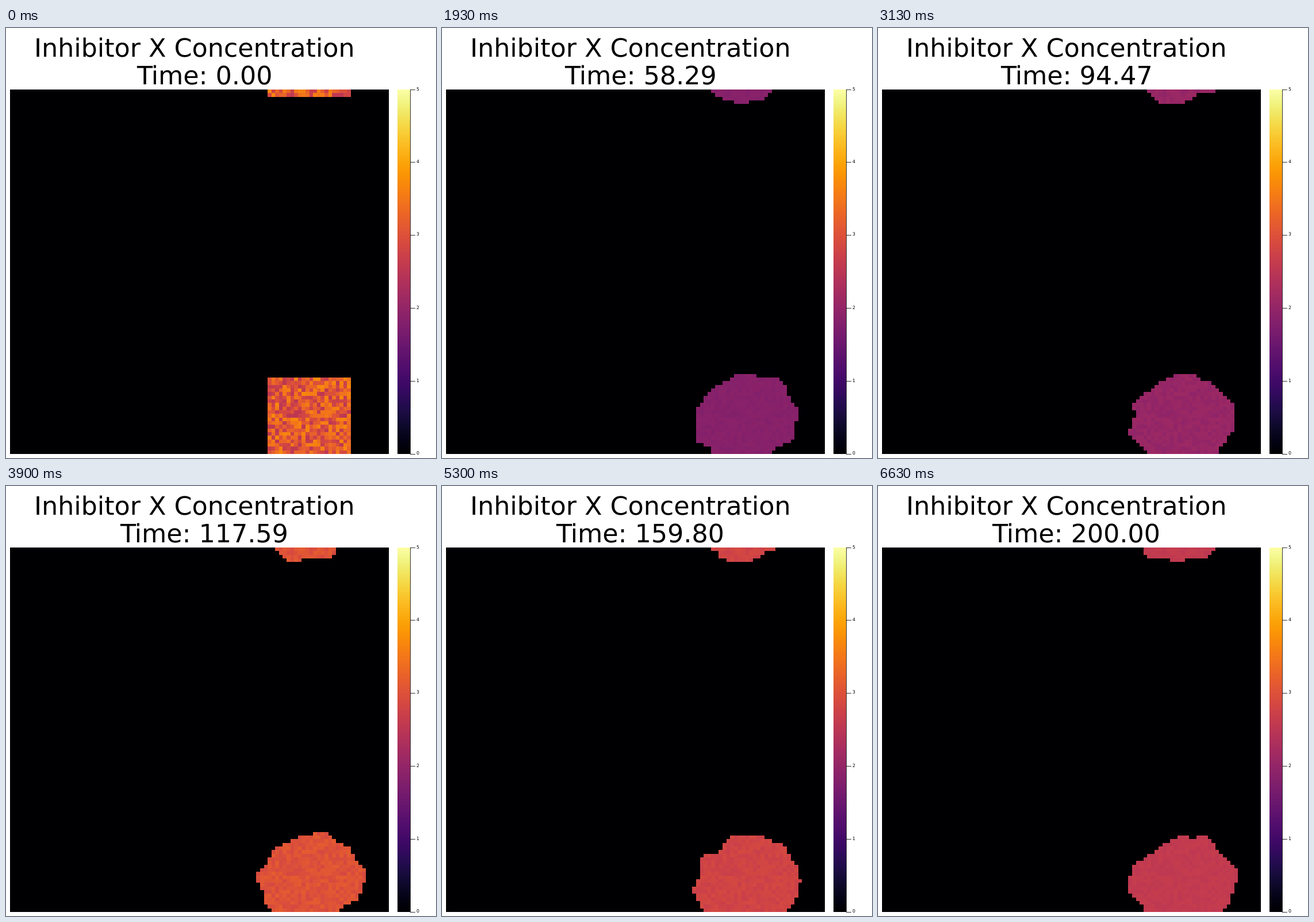
Recreate the animation shown at these times as a matplotlib script. Size 748x748 px, loop 6.66 s.

```python
import numpy as np
import matplotlib.pyplot as plt
from matplotlib.animation import FuncAnimation

W = H = 748
N = 100                  # lattice size
STEPS = 200              # simulation states per loop
LOOP, TICK = 6660, 20    # ms
T_END = 200.0
VMAX = 5
PERIOD, TROUGH = 40, 59  # oscillation, in steps

plt.rcParams["font.family"] = "DejaVu Sans"
plt.rcParams["text.hinting"] = "none"

rng = np.random.default_rng(7)
noise = rng.uniform(-1, 1, (N, N))
waves = [(k, rng.uniform(0, 2 * np.pi), rng.uniform(-0.3, 0.3))
         for k in range(3, 12)]

yy, xx = np.mgrid[:N, :N] + 0.5
yy[: N // 2] += N        # periodic: the top rows continue below the bottom


def cell_mask(i):
    """A square block that rounds off, then slowly widens into a lozenge."""
    square, age = np.exp(-i / 6), i / (STEPS - 1)
    a = 13.1 + 1.4 * age - 2.1 * square
    b = 12.9 - 0.3 * age - 1.4 * square
    power = 1 / max((0.5 + 0.1 * age) * (1 - square), 0.02)
    y = yy - (90.2 + 1.6 * age + 0.3 * square)
    x = xx - (79 + 0.6 * age) + 0.1 * (1 - square) * y
    angle = np.arctan2(y, x)
    rough = sum(np.sin(k * angle + phase + speed * i)
                for k, phase, speed in waves)
    shape = np.abs(x / a) ** power + np.abs(y / b) ** power
    return shape + 0.03 * (1 - square) * rough <= 1


def field(i):
    """Damped oscillation, with site noise that dies out over time."""
    swing = abs(np.sin(np.pi * (i - TROUGH) / PERIOD))
    amp = 2.35 * np.exp(-i / 175) * (1 - 0.46 * np.exp(-i / 9))
    spread = 0.6 * np.exp(-i / 80) * (0.1 + 0.9 * swing)
    return np.where(cell_mask(i), 1.84 + amp * swing ** 2 + spread * noise, 0)


def px(size):
    return size * 72 / 100


fig = plt.figure(figsize=(W / 100, H / 100), dpi=100, facecolor="white")
ax = fig.add_axes([0, 0, 1, 1])
ax.axis("off")

TOP, BOTTOM = 107, 741
style = dict(cmap="inferno", aspect="auto", interpolation="nearest")
heat = ax.imshow(field(0), vmin=0, vmax=VMAX,
                 extent=(7, 666, BOTTOM, TOP), **style)
ax.imshow(np.linspace(1, 0, 256)[:, None],
          extent=(681, 703, BOTTOM, TOP), **style)

line = dict(color="black", lw=px(0.8))
ax.plot([703.5, 703.5], [TOP, BOTTOM], **line)
for v in range(VMAX + 1):
    y = BOTTOM - 0.5 - (BOTTOM - TOP) * v / VMAX
    ax.plot([703.5, 711], [y, y], **line)
    ax.text(713.5, y + 2, str(v), fontsize=px(7.8))

title = dict(fontsize=px(44.35), ha="center")
ax.text(327.3, 50, "Inhibitor X Concentration", **title)
clock = ax.text(345, 98, "", **title)

ax.set_xlim(0, W)
ax.set_ylim(H, 0)


def update(tick):
    i = int((tick * TICK + 12) * STEPS / LOOP)
    heat.set_data(field(i))
    clock.set_text(f"Time: {i * T_END / (STEPS - 1):.2f}")
    return heat, clock


anim = FuncAnimation(fig, update, frames=LOOP // TICK, interval=TICK,
                     repeat=True, repeat_delay=0)
plt.show()
```
